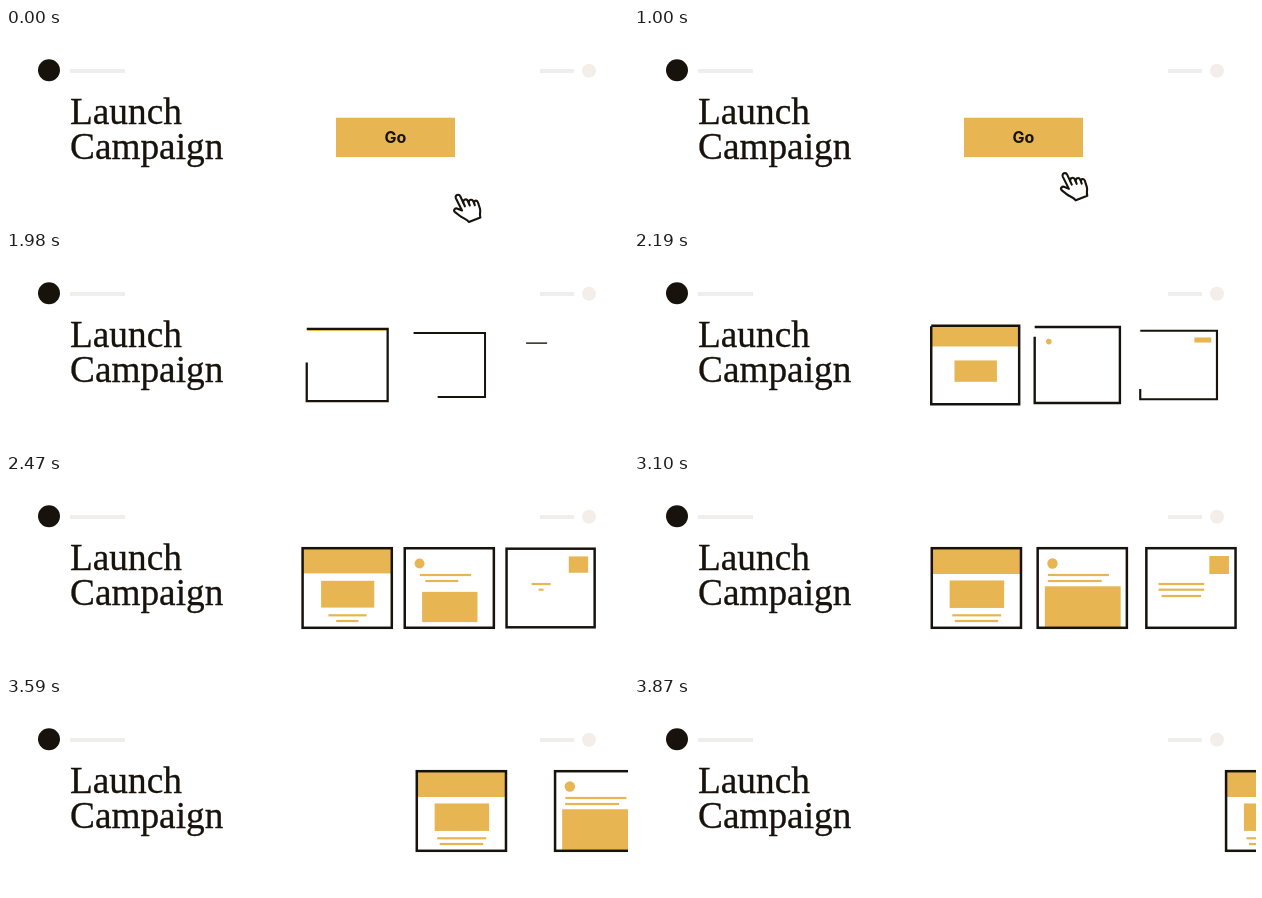
An HTML page with a canvas for the animation above (3940 ms loop, 622 px wide and 195 px high).

```html
<!DOCTYPE html>
<html lang="en">
<head>
<meta charset="utf-8">
<title>Launch Campaign</title>
<style>
html, body { margin: 0; width: 100%; height: 100%; overflow: hidden; background: #fff; }
canvas { display: block; width: 622px; height: 195px; }
</style>
</head>
<body>
<canvas id="stage"></canvas>
<script>
const W = 622, H = 195, LOOP = 3940, HOLD = 1000, STEP = 70;
const INK = '#17120c', GOLD = '#e7b652', PALE = '#efeeed';
const canvas = document.getElementById('stage');
const ctx = canvas.getContext('2d');
const dpr = window.devicePixelRatio || 1;
canvas.width = W * dpr;
canvas.height = H * dpr;

const clamp = v => Math.max(0, Math.min(1, v));
const span = (t, start, length) => clamp((t - start) / length);
const outPow = (u, n) => 1 - Math.pow(1 - u, n);
const outExpo = u => u >= 1 ? 1 : 1 - Math.pow(2, -10 * u);
const grow = (t, start) => outExpo(span(t, start, 912));

function rect(x, y, w, h, color) {
  ctx.fillStyle = color;
  ctx.fillRect(x, y, w, h);
}

function disc(x, y, r, color) {
  ctx.fillStyle = color;
  ctx.beginPath();
  ctx.arc(x, y, r, 0, Math.PI * 2);
  ctx.fill();
}

// Rectangle scaled from its centre
function block(x, y, w, h, k) {
  rect(x - w * k / 2, y - h * k / 2, w * k, h * k, GOLD);
}

// Text line widening from its middle
function bar(x, y, w, k) {
  rect(x - w * k / 2, y - 1.1, w * k, 2.2, GOLD);
}

const cards = [
  {
    x: 341.2, enter: 1688, exit: 3014,
    draw(t) {
      rect(-44, -39.5, 88, 25.5 * grow(t, 1969), GOLD);
      block(0.5, 6.2, 54.5, 27.5, grow(t, 1985));
      bar(0.3, 27.3, 49, grow(t, 2271));
      bar(0.1, 33, 43.5, grow(t, 2376));
    }
  },
  {
    x: 443.3, enter: 1805, exit: 2944,
    draw(t) {
      disc(-29.8, -24.5, 5.2 * grow(t, 2080), GOLD);
      bar(-3.8, -13, 61, grow(t, 2229));
      bar(-7.5, -7, 54, grow(t, 2346));
      block(0.5, 19, 76, 41.5, grow(t, 2298));
    }
  },
  {
    x: 544.6, enter: 1958, exit: 2872,
    draw(t) {
      rect(18.4, -32, 19.6, 18 * grow(t, 2138), GOLD);
      bar(-9.6, -4, 46, grow(t, 2398));
      bar(-9.6, 1.7, 46, grow(t, 2455));
      bar(-9.6, 8, 40, grow(t, 2520));
    }
  }
];

function drawCard(card, t) {
  if (t < card.enter) return;
  const w = 89.2, h = 79.6, around = 2 * (w + h);
  const slide = Math.pow(Math.max(0, t - card.exit) * 0.0125, 2.4);
  const size = 0.5 + 0.5 * outPow(span(t, card.enter, 850), 4);
  const trace = outPow(span(t, card.enter, 560), 3);
  ctx.save();
  ctx.translate(card.x + slide, 114);
  ctx.scale(size, size);
  card.draw(t);
  if (trace < 0.999) ctx.setLineDash([around * trace, around]);
  ctx.strokeStyle = INK;
  ctx.lineWidth = 2.5;
  ctx.strokeRect(-w / 2, -h / 2, w, h);
  ctx.restore();
}

const hand = new Path2D(
  'M8.6 17L2.6 5C1 1.5 5.5 -.2 7 3L9.8 9C9.3 6 13.5 4.5 14.6 7.8L15.4 9.6' +
  'C15 6 18.6 5 20 8L20.7 9.6C20.5 6.6 23.7 6.2 24.6 9L26.5 15' +
  'C27.5 18.5 25.8 20 27 24L15.5 28.5C13.5 25.5 9.5 25 6 22L1.6 18.6' +
  'C-.6 16.5 2 14 4.3 15.2Z');
const knuckles = new Path2D('M9.8 9L11.5 12.8M15.4 9.6L16.4 12M20.7 9.6L21.4 11.8');

function drawHand(t) {
  const p = outPow(span(t, 930, 500), 3);
  ctx.save();
  ctx.translate(447.4 - 58 * p, 165.5 - 59.5 * p);
  ctx.fillStyle = '#fff';
  ctx.strokeStyle = INK;
  ctx.lineWidth = 2.1;
  ctx.lineJoin = ctx.lineCap = 'round';
  ctx.fill(hand);
  ctx.stroke(hand);
  ctx.stroke(knuckles);
  ctx.restore();
}

function drawButton(t) {
  const press = Math.sin(Math.PI * span(t, 1280, 210));
  const k = 1 - 0.05 * press;
  ctx.save();
  ctx.translate(389.5, 109.5);
  ctx.scale(k, k);
  rect(-59.5, -19.8, 119, 39.4, GOLD);
  ctx.fillStyle = INK;
  ctx.font = '700 16px Inter, sans-serif';
  ctx.textAlign = 'center';
  ctx.fillText('Go', 0, 5.8);
  ctx.restore();
}

function drawPage() {
  rect(0, 0, W, H, '#fff');
  disc(43, 42.3, 11, INK);
  rect(64, 41, 55, 4, PALE);
  rect(534, 41, 34, 4, PALE);
  disc(583, 42.8, 7, '#f3eeea');
  ctx.font = '37.3px "Liberation Serif", serif';
  ctx.textAlign = 'left';
  ctx.fillStyle = ctx.strokeStyle = INK;
  ctx.lineWidth = 0.3;
  [['Launch', 96], ['Campaign', 130.5]].forEach(([word, y]) => {
    ctx.fillText(word, 64, y);
    ctx.strokeText(word, 64, y);
  });
}

function render(now) {
  const raw = now % LOOP;
  const t = raw < HOLD ? 0 : HOLD + Math.floor((raw - HOLD) / STEP) * STEP;
  ctx.setTransform(dpr, 0, 0, dpr, 0, 0);
  drawPage();
  if (t < 1560) {
    drawButton(t);
    drawHand(t);
  } else {
    cards.forEach(card => drawCard(card, t));
  }
}

const begin = performance.now();
function tick() {
  render(performance.now() - begin);
  requestAnimationFrame(tick);
}
tick();
</script>
</body>
</html>
```
